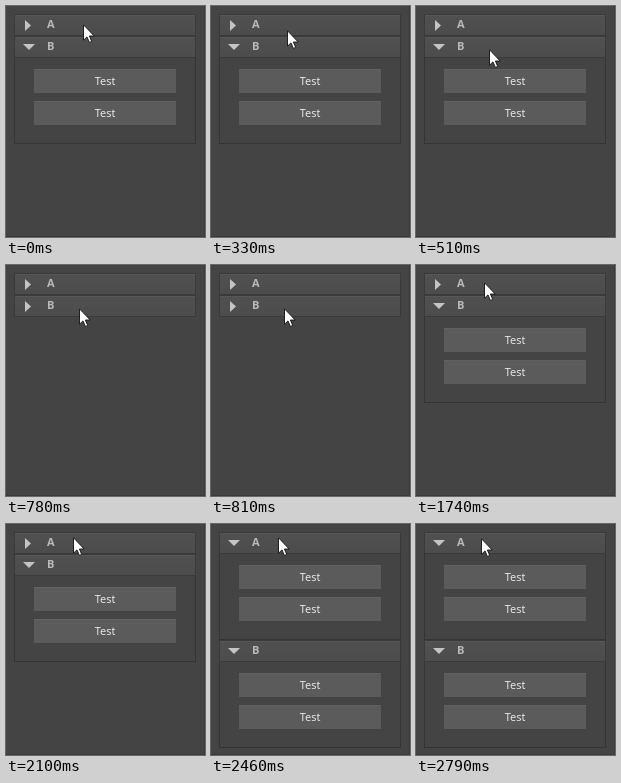
These frames come from a looping animation (199x231 px, 2820 ms). An HTML page:

```html
<!DOCTYPE html>
<html lang="en">
<head>
<meta charset="utf-8">
<title>Foldouts</title>
<style>
  * { box-sizing: border-box; }
  html, body { margin: 0; width: 100%; height: 100%; overflow: hidden; background: #444; }
  .stage {
    position: relative; width: 199px; height: 231px; padding: 8px 9px 0 8px; overflow: hidden;
    border: solid #3a3a3a; border-width: 0 1px 1px 0;
    font: 11px "Open Sans", "Noto Sans", sans-serif;
  }
  .head {
    position: relative; width: 182px; height: 22px; padding-left: 32px;
    border: 1px solid #3a3a3a;
    background: linear-gradient(#575757 1px, #505050 1px, #4c4c4c);
    color: #bababa; font-weight: 700; line-height: 18px;
  }
  .arrow { position: absolute; left: 8px; top: 5px; width: 12px; height: 11px; background: #c4c4c4; }
  .body { position: relative; width: 182px; overflow: hidden; }
  .panel { height: 86px; padding: 11px 19px 0; border: 1px solid #343434; border-top: 0; }
  .button {
    width: 142px; height: 24px; margin-bottom: 8px;
    background: #5b5b5b; border: solid #616161; border-width: 1px 0 0;
    color: #f0f0f0; text-align: center; line-height: 22px;
  }
  .cursor { position: absolute; width: 12px; height: 19px; animation: move 2820ms infinite; }
  .cursor svg { display: block; }

  .a .body { animation: a-body 2820ms step-end infinite; }
  .a .arrow { animation: a-arrow 2820ms step-end infinite; }
  .b .body { animation: b-body 2820ms step-end infinite; }
  .b .arrow { animation: b-arrow 2820ms step-end infinite; }

  .stage {
    --closed: polygon(2px 0, 8px 5.5px, 2px 11px);
    --open: polygon(0 2px, 12px 2px, 6px 8px);
  }
  @keyframes a-body { 0% { height: 0; } 87.234%, 100% { height: 86px; } }
  @keyframes a-arrow { 0% { clip-path: var(--closed); } 87.234%, 100% { clip-path: var(--open); } }
  @keyframes b-body {
    0%, 52.1276%, 100% { height: 86px; }
    27.6595% { height: 0; }
  }
  @keyframes b-arrow {
    0%, 52.1276%, 100% { clip-path: var(--open); }
    27.6595% { clip-path: var(--closed); }
  }
  /* The pointer advances in 30 ms ticks; left/top snap it to whole pixels. */
  @keyframes move {
    0% { left: 77px; top: 18px; animation-timing-function: step-end; }
    9.5744% { left: 77px; top: 18px; animation-timing-function: steps(3, start); }
    12.7659% { left: 76px; top: 24px; animation-timing-function: steps(3, start); }
    15.9574% { left: 74px; top: 37px; animation-timing-function: steps(3, start); }
    19.1489% { left: 73px; top: 43px; animation-timing-function: step-end; }
    53.1914% { left: 73px; top: 43px; animation-timing-function: steps(4, start); }
    57.4468% { left: 72px; top: 36px; animation-timing-function: steps(4, start); }
    61.7021% { left: 68px; top: 18px; animation-timing-function: steps(5, start); }
    67.0212% { left: 66px; top: 11px; animation-timing-function: step-end; }
    73.4042% { left: 67px; top: 12px; animation-timing-function: step-end; }
    74.468% { left: 67px; top: 13px; animation-timing-function: step-end; }
    98.9361% { left: 65px; top: 14px; animation-timing-function: step-end; }
    100% { left: 65px; top: 14px; }
  }
</style>
</head>
<body>
<div class="stage">
  <div class="a">
    <div class="head"><i class="arrow"></i>A</div>
    <div class="body"><div class="panel">
      <div class="button">Test</div>
      <div class="button">Test</div>
    </div></div>
  </div>
  <div class="b">
    <div class="head"><i class="arrow"></i>B</div>
    <div class="body"><div class="panel">
      <div class="button">Test</div>
      <div class="button">Test</div>
    </div></div>
  </div>
  <div class="cursor">
    <svg width="12" height="19" viewBox="0 0 12 19">
      <path d="M.5 .8V16.2L4 12.9L6.4 18.4L8.7 17.4L6.4 12H11.2Z" fill="#fff" stroke="#111" stroke-width=".9"/>
    </svg>
  </div>
</div>
</body>
</html>
```
